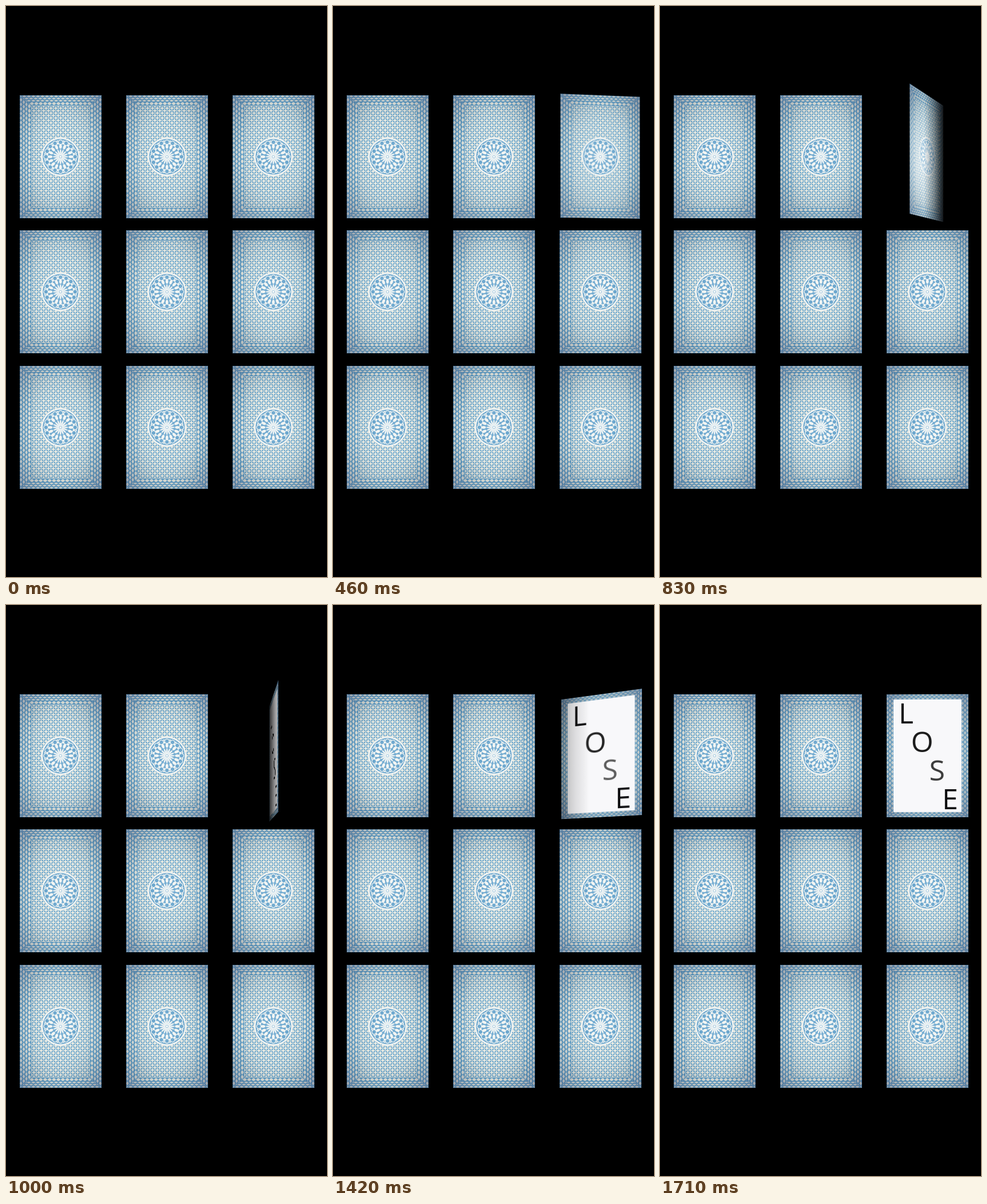
Write an HTML page with a canvas that moves like this. It is 561x998 px and loops after 1.75 s.

```html
<!DOCTYPE html>
<html lang="en">
<head>
<meta charset="utf-8">
<title>Card flip</title>
<style>
  html, body { margin: 0; width: 100%; height: 100%; overflow: hidden; background: #000; }
  #stage {
    position: relative; width: 561px; height: 998px; overflow: hidden;
    perspective: 1050px; perspective-origin: 50% 50%;
  }
  .card { position: absolute; width: 143px; height: 215px; }
  .flip { transform-style: preserve-3d; }
  .face { position: absolute; inset: 0; backface-visibility: hidden; }
  .front { transform: rotateY(180deg); }
  canvas, svg, .shade { position: absolute; left: 0; top: 0; width: 143px; height: 215px; }
  text { font: 50px "Open Sans", "Noto Sans", sans-serif; fill: #0e0e10; }
</style>
</head>
<body>
<div id="stage"></div>
<script>
const W = 143, H = 215, SCALE = 2;
const BLUE = '#5c9fcb', PAPER = '#eaece3', WHITE = '#f6f8f5';
const TAU = Math.PI * 2;
const stage = document.getElementById('stage');

function makeCanvas(paint) {
  const canvas = document.createElement('canvas');
  canvas.width = W * SCALE;
  canvas.height = H * SCALE;
  const c = canvas.getContext('2d');
  c.scale(SCALE, SCALE);
  paint(c);
  return canvas;
}

function rhomb(c, x, y, rx, ry) {
  c.beginPath();
  c.moveTo(x - rx, y);
  c.lineTo(x, y - ry);
  c.lineTo(x + rx, y);
  c.lineTo(x, y + ry);
  c.fill();
}

function oval(c, x, y, rx, ry, turn = 0) {
  c.beginPath();
  c.ellipse(x, y, rx, ry, turn, 0, TAU);
  c.fill();
}

function ring(c, x, y, r, width) {
  c.lineWidth = width;
  c.beginPath();
  c.arc(x, y, r, 0, TAU);
  c.stroke();
}

// One mitred side of a frame, drawn along the local x axis.
function side(c, matrix, len, depth, cut, rows) {
  c.save();
  c.transform(...matrix);
  c.beginPath();
  c.moveTo(0, 0);
  c.lineTo(len, 0);
  c.lineTo(len - cut, depth);
  c.lineTo(cut, depth);
  c.closePath();
  c.clip();
  c.fillStyle = BLUE;
  c.fillRect(0, 0, len, depth);
  c.fillStyle = PAPER;
  const step = len / Math.round(len / 8), rowH = depth / rows;
  for (let r = 0; r < rows; r++) {
    for (let x = (r % 2) * step / 2; x <= len; x += step) {
      rhomb(c, x, (r + 0.5) * rowH, step * 0.49, rowH * 0.47);
    }
  }
  c.restore();
}

function frame(c, x, y, w, h, bx, by, rows) {
  c.save();
  c.translate(x, y);
  side(c, [1, 0, 0, 1, 0, 0], w, by, bx, rows);
  side(c, [1, 0, 0, -1, 0, h], w, by, bx, rows);
  side(c, [0, 1, 1, 0, 0, 0], h, bx, by, rows);
  side(c, [0, 1, -1, 0, w, 0], h, bx, by, rows);
  c.restore();
}

// Grid of slanted petals that close into crosses and rings.
function field(c, x, y, w, h, cols, rows) {
  const dx = w / cols, dy = h / rows;
  c.fillStyle = BLUE;
  for (let j = 0; j < rows; j++) {
    for (let i = 0; i < cols; i++) {
      const turn = (i + j) % 2 ? -TAU / 8 : TAU / 8;
      oval(c, x + (i + 0.5) * dx, y + (j + 0.5) * dy, 2.3, 0.95, turn);
    }
  }
}

function medallion(c, x, y) {
  const spokes = 16;
  c.save();
  c.translate(x, y);
  c.fillStyle = WHITE;
  oval(c, 0, 0, 33.5, 33.5);
  c.fillStyle = BLUE;
  oval(c, 0, 0, 31, 31);
  c.fillStyle = c.strokeStyle = WHITE;
  for (let i = 0; i < spokes; i++) {
    oval(c, 8.5, 0, 5, 1.25);
    oval(c, 18.2, 0, 4.2, 2.4);
    ring(c, 25.4, 0, 3.9, 1.3);
    c.rotate(TAU / spokes / 2);
    rhomb(c, 23.5, 0, 2.2, 1.7);
    oval(c, 28, 0, 1.1, 1.5);
    c.rotate(TAU / spokes / 2);
  }
  oval(c, 0, 0, 4.4, 4.4);
  c.strokeStyle = BLUE;
  ring(c, 0, 0, 2.4, 0.8);
  c.restore();
}

// Soft light in the middle, grey falloff towards the edges.
function vignette(c) {
  c.save();
  c.translate(W / 2, H / 2);
  c.scale(W / H, 1);
  const g = c.createRadialGradient(0, 0, 0, 0, 0, 140);
  g.addColorStop(0, 'rgba(250,252,255,.25)');
  g.addColorStop(0.4, 'rgba(200,208,212,.08)');
  g.addColorStop(0.75, 'rgba(70,85,100,.2)');
  g.addColorStop(1, 'rgba(55,65,95,.38)');
  c.fillStyle = g;
  c.fillRect(-H / 2, -H / 2, H, H);
  c.restore();
}

function paintBack(c) {
  c.fillStyle = PAPER;
  c.fillRect(0, 0, W, H);
  frame(c, 0, 0, W, H, 14, 11.5, 3);
  frame(c, 13.5, 11, W - 27, H - 22, 6.5, 7, 1);
  c.strokeStyle = BLUE;
  c.lineWidth = 1.2;
  c.strokeRect(14, 11.5, W - 28, H - 23);
  c.strokeRect(19.7, 17.6, W - 39.4, H - 35.2);
  field(c, 20.5, 18.5, W - 41, H - 37, 24, 42);
  medallion(c, 71.3, 107.5);
  vignette(c);
}

function paintFront(c) {
  frame(c, 0, 0, W, H, 12, 9, 3);
  vignette(c);
  c.fillStyle = '#f8f8fa';
  c.fillRect(12, 9, W - 24, H - 18);
}

function div(className, parent) {
  const el = document.createElement('div');
  el.className = className;
  parent.append(el);
  return el;
}

function addCard(col, row) {
  const card = div('card', stage);
  card.style.left = 24 + col * 186 + 'px';
  card.style.top = Math.round(155.8 + row * 236.4) + 'px';
  return card;
}

let flip;
for (let row = 0; row < 3; row++) {
  for (let col = 0; col < 3; col++) {
    const card = addCard(col, row);
    if (row === 0 && col === 2) flip = card;
    else card.append(makeCanvas(paintBack));
  }
}

flip.classList.add('flip');
const back = div('face back', flip), front = div('face front', flip);
back.append(makeCanvas(paintBack));
front.append(makeCanvas(paintFront));
front.insertAdjacentHTML('beforeend', `
  <svg viewBox="0 0 143 215">
    <text x="21" y="51">L</text>
    <text x="42.8" y="101.5">O</text>
    <text x="74.4" y="151">S</text>
    <text x="97" y="201">E</text>
  </svg>`);
const backShade = div('shade', back), frontShade = div('shade', front);
const [, letterO, letterS] = front.querySelectorAll('text');

const LOOP = 1750, TICK = 1000 / 24, START = 7 * TICK;

function grey(v) {
  const n = Math.round(v);
  return `rgb(${n},${n},${n})`;
}

function shadow(dir, alpha, reach) {
  return `linear-gradient(${dir}, rgba(0,0,0,${alpha}), rgba(0,0,0,${alpha * 0.42}) ${reach * 0.5}%, transparent ${reach}%)`;
}

function draw(time) {
  // The motion is held at 24 poses per second.
  const held = Math.floor((time % LOOP + 5) / TICK) * TICK;
  const p = Math.min(1, Math.max(0, (held - START) / (LOOP - START)));
  const angle = 180 * p * p * (3 - 2 * p);
  const rad = angle * Math.PI / 180;
  const tilt = 1 - Math.abs(Math.cos(rad));

  flip.style.transform = `rotateY(${angle}deg)`;
  backShade.style.background =
    shadow('to left', Math.min(0.85, 1.5 * tilt ** 0.65), 20 + 90 * tilt) +
    `, radial-gradient(ellipse 60% 50% at 28% 60%, rgba(255,255,255,${0.6 * Math.sin(rad)}), transparent)`;
  frontShade.style.background =
    shadow('to right', Math.min(0.82, 1.2 * tilt ** 0.6), 35 + 130 * tilt * tilt);

  const gloss = Math.exp(-(((angle - 162) / 22) ** 2));
  letterS.style.fill = grey(15 + 85 * gloss);
  letterO.style.fill = grey(14 + 26 * gloss);
}

const origin = performance.now();
function loop() {
  draw(performance.now() - origin);
  requestAnimationFrame(loop);
}
draw(0);
requestAnimationFrame(loop);
</script>
</body>
</html>
```
